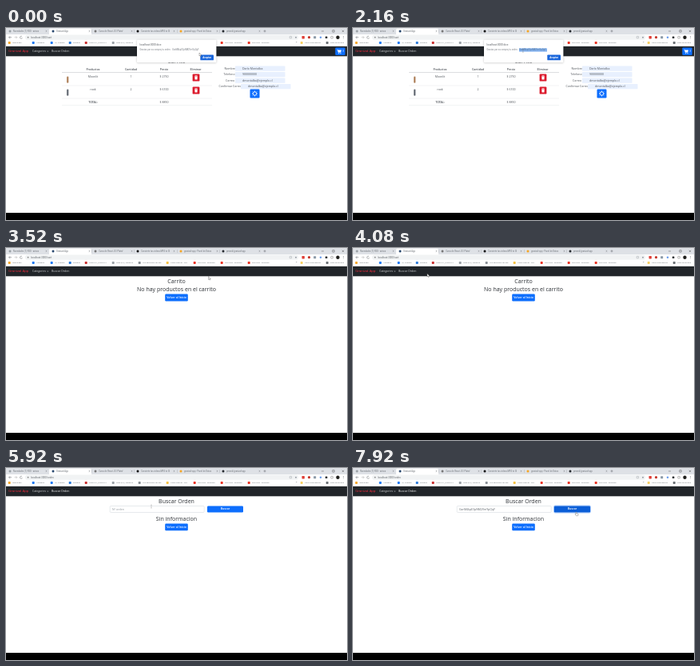
Recreate the animation shown at these times as an HTML page with a canvas. Size 427 by 240 pixels, loop 8 s.

```html
<!DOCTYPE html>
<html lang="es">
<head>
<meta charset="utf-8">
<title>Granizal App</title>
<style>
html, body { margin: 0; width: 100%; height: 100%; overflow: hidden; background: #fff; }
canvas { display: block; width: 427px; height: 240px; }
</style>
</head>
<body>
<canvas id="stage"></canvas>
<script>
const W = 427, H = 240, LOOP = 8000;
const UI = '"Open Sans", "Noto Sans", sans-serif';
const CHROME = 'Roboto, "Noto Sans", sans-serif';
const BLUE = '#0d6efd', INK = '#212529', SOFT = '#4d5258', RED = '#dc1a2c';
const ORDER = 'GarM4kpE3pNM2VmYpQqF';

const CLOSE = 3520, OPEN_SEARCH = 5200, FOCUS = 6320, PASTE = 6720, SUBMIT = 7760;

const canvas = document.getElementById('stage');
const c = canvas.getContext('2d');
const dpr = window.devicePixelRatio || 1;
canvas.width = W * dpr;
canvas.height = H * dpr;

function rect(x, y, w, h, color) {
  c.fillStyle = color;
  c.fillRect(x, y, w, h);
}

function box(x, y, w, h, r, fill, stroke, lw = 0.4) {
  c.beginPath();
  c.roundRect(x, y, w, h, r);
  if (fill) { c.fillStyle = fill; c.fill(); }
  if (stroke) { c.strokeStyle = stroke; c.lineWidth = lw; c.stroke(); }
}

function dot(x, y, r, color) {
  c.beginPath();
  c.arc(x, y, r, 0, Math.PI * 2);
  c.fillStyle = color;
  c.fill();
}

function trace(points) {
  c.beginPath();
  points.forEach(([x, y], i) => i ? c.lineTo(x, y) : c.moveTo(x, y));
}

function line(points, color, lw = 0.5) {
  trace(points);
  c.strokeStyle = color;
  c.lineWidth = lw;
  c.stroke();
}

function poly(points, color) {
  trace(points);
  c.fillStyle = color;
  c.fill();
}

function text(s, x, y, size, color = SOFT, align = 'left', weight = 400, family = UI) {
  c.font = `${weight} ${size}px ${family}`;
  c.textAlign = align;
  c.textBaseline = 'middle';
  c.fillStyle = color;
  c.fillText(s, x, y);
}

const label = (s, x, y, size, color) => text(s, x, y, size, color, 'left', 400, CHROME);

function button(s, x, y, w, h, fill = BLUE) {
  box(x, y, w, h, 1.2, fill);
  text(s, x + w / 2, y + h / 2, 3.5, '#fff', 'center', 600);
}

// ---- Browser frame ----

const tabs = [
  [3, '#9aa0a6', 'Novedades (1) RSS - avisos'],
  [57, '#26466d', 'Granizal App'],
  [110, '#777', 'Curso de React JS | Plataf'],
  [163, '#111', 'Convierte tus videos MP4 to GIF'],
  [217, '#f5a623', 'granizal-app - Panel de Datos'],
  [270, '#24292e', 'pmoral/granizal-app']
];

const bookmarks = [
  [4, '#f4a62a', 'Importado'],
  [34, '#1877f2', 'Amigario'],
  [57, '#1877f2', '(1) Charlita'],
  [80, '#2979d9', 'boletin5'],
  [100, '#c92b2b', 'Curso P1_POSTULA'],
  [134, '#9aa0a6', 'Guia (IV) | Tableros'],
  [167, '#8a9096', 'Los ejercicios del dia'],
  [202, '#f6c244', 'Como buscar - Vid..'],
  [236, '#ea3323', 'Dia a Dia - Nomada..'],
  [270, '#ea3323', 'Dia a Dia - Nomada..'],
  [304, '#ea3323', 'Dia a Dia - Nomada..'],
  [370, '#f6cf65', 'Otros marcadores'],
  [402, '#6b7075', 'Lista de lectura']
];

function cross(x, y, r, color) {
  line([[x - r, y - r], [x + r, y + r]], color, 0.4);
  line([[x + r, y - r], [x - r, y + r]], color, 0.4);
}

function drawBrowser(path) {
  rect(0, 0, W, 8, '#dee1e6');
  box(54, 0.8, 53, 8, [1.5, 1.5, 0, 0], '#fff');
  tabs.forEach(([x, color, title], i) => {
    dot(x + 2, 3.9, 1.5, color);
    c.save();
    c.beginPath();
    c.rect(x, 0, 42, 8);
    c.clip();
    label(title, x + 6, 4, 2.65, '#70757a');
    c.restore();
    cross(x + 47.5, 3.9, 0.8, '#5f6368');
    if (i > 1) rect(x - 3, 2, 0.4, 4, '#a5a9ae');
  });
  line([[322.5, 3.9], [325.5, 3.9]], '#5f6368');
  line([[324, 2.4], [324, 5.4]], '#5f6368');
  line([[395, 4], [398, 4]], '#333', 0.4);
  box(408.8, 2.7, 2.4, 2.4, 0, null, '#333');
  cross(422, 3.9, 1.2, '#333');

  rect(0, 8, W, 15, '#fff');
  line([[7, 11.7], [3.7, 11.7]], '#5f6368');
  line([[5.1, 10.2], [3.6, 11.7], [5.1, 13.2]], '#5f6368');
  line([[10.5, 11.7], [13.8, 11.7]], '#aaa');
  line([[12.4, 10.2], [13.9, 11.7], [12.4, 13.2]], '#aaa');
  c.beginPath();
  c.arc(19, 11.7, 1.5, 0.3, 5.4);
  c.strokeStyle = '#5f6368';
  c.stroke();
  box(24, 8.6, 342, 6.2, 3.1, '#f1f3f4');
  dot(27.6, 11.7, 0.9, '#888');
  label('localhost:3000/' + path, 31, 11.8, 3, '#666b70');
  box(355.2, 10.4, 2.4, 2.4, 0.5, null, '#8a9096');
  dot(363, 11.7, 1, '#9aa0a6');
  box(370.5, 10, 3.4, 3.4, 0.6, '#e0413a');
  dot(379.5, 11.7, 1.6, '#c5372c');
  box(385.2, 10.2, 3, 3, 0.4, '#8796a5');
  dot(394, 11.7, 1.3, '#6d9eeb');
  box(399.8, 10.4, 2.6, 2.6, 0.5, '#303336');
  box(406.8, 10.4, 2.6, 2.6, 0.4, null, '#555');
  dot(415.5, 11.7, 2.2, '#20201d');
  for (let i = -1; i < 2; i++) dot(422.5, 11.7 + i * 1.2, 0.4, '#5f6368');

  bookmarks.forEach(([x, color, title]) => {
    box(x - 1.3, 17, 3, 3, 0.7, color);
    label(title, x + 4, 18.6, 2.5, '#6b7075');
  });
  label('»', 363, 18.4, 3, '#5f6368');
  rect(0, 22.5, W, 0.5, '#d8dade');
  rect(0, 231, W, 9, '#000');
}

// ---- Pages ----

function drawNav(search, hover, cart) {
  const dim = '#d0d2d4';
  rect(0, 23, W, 12.3, INK);
  text('Granizal App', 3, 29.2, 4.3, '#f02b3c');
  text('Categories', 33, 29.2, 3.45, dim);
  poly([[51.3, 28.7], [53.3, 28.7], [52.3, 29.8]], dim);
  text('Buscar Orden', 57, 29.2, 3.5, search || hover ? '#fff' : dim);
  if (!cart) return;
  box(412.3, 24.6, 12.4, 9.4, 1.2, BLUE);
  line([[414.4, 27.2], [415.4, 27.2], [416.2, 30.6], [419.4, 30.6]], '#fff', 0.6);
  poly([[415.4, 27.6], [420, 27.6], [419.4, 30], [416, 30]], '#fff');
  dot(416.7, 31.6, 0.6, '#fff');
  dot(419, 31.6, 0.6, '#fff');
  text('3', 422.2, 29.4, 3.4, '#fff', 'center');
}

const heading = (s, y) => text(s, 213.5, y, 7, '#2c3035', 'center', 500);

function cell(values, y, weight = 400) {
  [109, 156.5, 198, 237.5].forEach((x, i) => {
    if (values[i]) text(values[i], x, y, 3.5, SOFT, 'center', weight);
  });
}

function drawProduct(y, color, name, count, price) {
  box(76, y - 0.4, 2.4, 8.2, 1.2, color);
  cell([name, count, price], y);
  box(233.6, y - 3.6, 8.8, 9.2, 1.2, RED);
  rect(236, y - 1.3, 4, 0.8, '#fff');
  rect(237.2, y - 1.9, 1.6, 0.6, '#fff');
  box(236.4, y - 0.2, 3.2, 3.7, 0.4, '#fff');
}

function drawCart() {
  heading('Carrito', 41.9);
  cell(['Productos', 'Cantidad', 'Precio', 'Eliminar'], 52, 600);
  rect(70, 55.5, 188, 0.4, '#a9adb1');
  drawProduct(61, '#b58a66', 'Moonlit', '1', '$ 2750');
  drawProduct(77, '#70757e', 'rook', '2', '$ 6100');
  cell(['TOTAL:', '', ''], 92.8, 600);
  cell(['', '', '$ 8850'], 92.8);
  [71.8, 87.8, 96.6].forEach(y => rect(70, y, 188, 0.4, '#dee2e6'));

  [
    ['Nombre', 273.5, 287, 47.4, 'Darío Montalba'],
    ['Telefono', 272.5, 287, 54.9, '900000000'],
    ['Correo', 275, 287, 62.4, 'dmontalba@ejemplo.cl'],
    ['Confirmar Correo', 266.5, 294, 69.9, 'dmontalba@ejemplo.cl']
  ].forEach(([name, lx, x, y, value]) => {
    text(name, lx, y + 3.2, 3.5);
    box(x, y, 62.5, 6.4, 0.6, '#e8f0fe');
    text(value, x + 9, y + 3.2, 3.5);
  });
  drawSpinner(311.5, 82);
}

function drawSpinner(x, y) {
  box(x - 6, y - 5.4, 12, 10.8, 1.2, BLUE);
  for (let i = 0; i < 8; i++) {
    const a = i * Math.PI / 4, dx = Math.cos(a), dy = Math.sin(a);
    line([[x + 2 * dx, y + 2 * dy], [x + 3.4 * dx, y + 3.4 * dy]], '#fff', 0.9);
  }
  c.beginPath();
  c.arc(x, y, 2.2, 0, Math.PI * 2);
  c.lineWidth = 0.7;
  c.stroke();
}

function drawEmpty() {
  heading('Carrito', 41.9);
  heading('No hay productos en el carrito', 52);
  button('Volver al Inicio', 199.2, 57.6, 28.6, 8.8);
}

function drawSearch(t, pos) {
  const focused = t >= FOCUS && t < SUBMIT;
  const sent = t >= SUBMIT;
  const filled = t >= PASTE;
  heading('Buscar Orden', 41.9);
  if (focused) box(129.7, 47, 119, 9, 1.6, null, 'rgba(13,110,253,.25)', 0.9);
  box(130.2, 47.5, 118, 8, 1.1, '#fff', focused ? '#6aa5fd' : '#ced4da', 0.5);
  text(filled ? ORDER : 'N° orden', 133, 51.6, 3.5, filled ? '#5f656b' : '#8e959b');
  if (focused && !filled && (t - FOCUS) % 1000 < 500) rect(132.8, 49.7, 0.4, 3.8, INK);
  if (sent) box(251.5, 47, 46, 9, 1.6, null, 'rgba(49,132,253,.5)', 0.9);
  button('Buscar', 252, 47.5, 45, 8, sent || inside(pos, 252, 47, 45, 9) ? '#0b5ed7' : BLUE);
  heading('Sin informacion', 64);
  button('Volver al Inicio', 199.2, 69.6, 28.6, 8.6);
}

function drawAlert(t, pos) {
  c.save();
  c.shadowColor = 'rgba(0,0,0,.28)';
  c.shadowBlur = 2.4 * dpr;
  c.shadowOffsetY = 0.4 * dpr;
  box(164, 14.8, 99.4, 28.4, 1, '#fff');
  c.restore();
  label('localhost:3000 dice', 167.4, 21, 3.1, '#5a5e63');
  const from = t < 480 ? 243 : Math.max(208, t < 1120 ? pos[0] : 208);
  if (from < 243) rect(from, 25.4, 243 - from, 4.2, '#84b2ee');
  label('Gracias por su compra, tu orden:', 167.4, 27.6, 2.7, '#7c8187');
  label(ORDER, 208.3, 27.6, 2.7, t >= 1120 ? '#56789f' : '#7c8187');
  box(243.3, 33.4, 16.7, 6.9, 0.9, inside(pos, 243, 33, 17, 8) ? '#3b82e6' : '#1a66db');
  text('Aceptar', 251.6, 36.9, 3, '#fff', 'center', 700, CHROME);
}

// ---- Pointer ----

const path = [
  [0, 242, 31], [80, 242, 31], [320, 243, 27], [480, 243, 27], [1120, 208.3, 27.5],
  [2080, 208.3, 27.5], [2800, 249, 35], [2960, 249, 35], [3040, 253.5, 35.5],
  [3600, 253.5, 35.5], [3840, 188, 39], [4080, 93, 32], [4480, 64, 29.5], [4640, 66, 29],
  [5280, 66, 29], [5920, 182, 48], [6160, 177, 51.5], [6960, 177, 51.5],
  [7200, 251, 67], [7280, 252, 67], [7680, 279, 55], [8000, 279, 55]
];

function pointerAt(t) {
  const i = path.findIndex(p => p[0] > t);
  const [t0, x0, y0] = path[i - 1], [t1, x1, y1] = path[i];
  const k = (t - t0) / (t1 - t0);
  return [x0 + (x1 - x0) * k, y0 + (y1 - y0) * k];
}

const inside = ([px, py], x, y, w, h) => px >= x && px <= x + w && py >= y && py <= y + h;

function pointerKind(t, pos) {
  if (t < CLOSE) return inside(pos, 167, 25, 76, 5.5) ? 'beam' : 'arrow';
  if (inside(pos, 33, 26, 45, 6)) return 'hand';
  if (t >= OPEN_SEARCH) {
    if (inside(pos, 130, 47, 118, 9)) return 'beam';
    if (inside(pos, 252, 47, 45, 9)) return 'hand';
  }
  return 'arrow';
}

const shapes = {
  arrow: 'M0 0V4L.9 3.2 1.5 4.6 2.2 4.3 1.6 3H2.8Z',
  hand: 'M0 .3Q.5-.2.9.3V1.9L2.8 2.3Q3.3 2.5 3.1 3.4L2.7 4.7H.5L-1 2.8Q-.7 2.2 0 2.8Z'
};

function drawPointer(t, [x, y]) {
  const kind = pointerKind(t, [x, y]);
  if (kind === 'beam') {
    line([[x, y - 1.9], [x, y + 1.9]], '#666', 0.3);
    line([[x - 0.7, y - 2], [x + 0.7, y - 2]], '#666', 0.3);
    line([[x - 0.7, y + 2], [x + 0.7, y + 2]], '#666', 0.3);
    return;
  }
  const shape = new Path2D(shapes[kind]);
  c.save();
  c.translate(x, y);
  c.fillStyle = '#fff';
  c.fill(shape);
  c.strokeStyle = '#444';
  c.lineWidth = 0.35;
  c.stroke(shape);
  c.restore();
}

function draw(t) {
  const pos = pointerAt(t);
  const search = t >= OPEN_SEARCH, alertOpen = t < CLOSE;
  c.setTransform(dpr, 0, 0, dpr, 0, 0);
  rect(0, 0, W, H, '#fff');
  drawBrowser(search ? 'orden' : 'cart');
  drawNav(search, !alertOpen && inside(pos, 56, 26, 23, 6), alertOpen);
  if (search) drawSearch(t, pos);
  else if (alertOpen) drawCart();
  else drawEmpty();
  if (alertOpen) drawAlert(t, pos);
  drawPointer(t, pos);
}

const start = performance.now();
function tick() {
  draw((performance.now() - start) % LOOP);
  requestAnimationFrame(tick);
}
tick();
</script>
</body>
</html>
```
